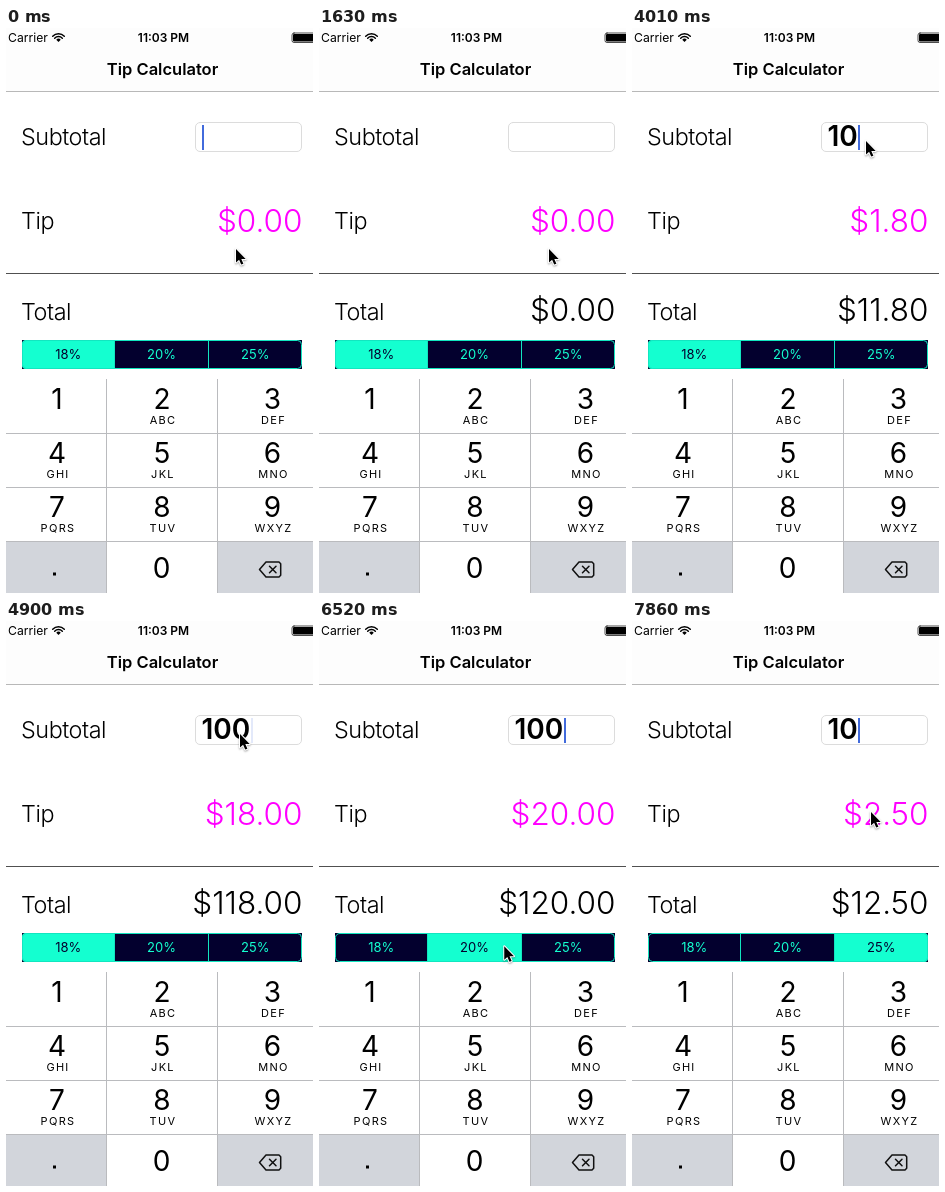
Recreate the animation shown at these times as an HTML page with a canvas. Size 307 by 565 pixels, loop 8 s.

```html
<!DOCTYPE html>
<html lang="en">
<head>
<meta charset="utf-8">
<title>Tip Calculator</title>
<style>
  html, body { margin: 0; width: 100%; height: 100%; overflow: hidden; background: #fff; }
  canvas { display: block; width: 307px; height: 565px; }
</style>
</head>
<body>
<canvas id="stage"></canvas>
<script>
const W = 307, H = 565, LOOP = 8000, TICK = 148;
const MINT = [20, 255, 208], NAVY = [3, 0, 46];
const canvas = document.getElementById('stage');
const ctx = canvas.getContext('2d');
const dpr = window.devicePixelRatio || 1;
canvas.width = W * dpr;
canvas.height = H * dpr;

const clamp = v => Math.max(0, Math.min(1, v));
const ease = v => v * v * (3 - 2 * v);
const mix = (a, b, k) => `rgb(${a.map((v, i) => Math.round(v + (b[i] - v) * k))})`;

function rect(x, y, w, h, color) {
  ctx.fillStyle = color;
  ctx.fillRect(x, y, w, h);
}

function box(x, y, w, h, r) {
  ctx.beginPath();
  ctx.roundRect(x, y, w, h, r);
}

function path(points, close) {
  ctx.beginPath();
  points.forEach(([x, y]) => ctx.lineTo(x, y));
  if (close) ctx.closePath();
}

function text(str, x, y, size, { weight = 400, color = '#000', align = 'left', gap = 0 } = {}) {
  ctx.font = `${weight} ${size}px Inter, Roboto, sans-serif`;
  ctx.letterSpacing = gap + 'px';
  ctx.textAlign = align;
  ctx.fillStyle = color;
  ctx.fillText(str, x, y);
  return ctx.measureText(str).width;
}

// Cursor stops: tick, x, y
const stops = [[0, 229, 220], [14, 229, 220], [20, 233, 112], [38, 233, 112],
  [41, 170, 324], [43, 170, 324], [46, 225, 325], [47, 225, 325], [50, 238, 190], [60, 238, 190]];

function cursorAt(n) {
  const i = stops.findIndex((s, j) => j > 0 && n <= s[0]);
  const [t0, x0, y0] = stops[i - 1], [t1, x1, y1] = stops[i];
  const k = ease((n - t0) / (t1 - t0));
  return [x0 + (x1 - x0) * k, y0 + (y1 - y0) * k];
}

// Each blink dims for one tick, then stays dark until the given tick
const blinks = [[3, 6, .5], [9, 12, .5], [15, 18, .5], [33, 36, .15], [39, 43, .5], [46, 49, .4]];

function caretAlpha(n) {
  const b = blinks.find(([from, to]) => n >= from && n < to);
  return !b ? 1 : n === b[0] ? b[2] : 0;
}

function subtotalAt(n) {
  return n < 24 ? '' : n < 27 ? '1' : n < 29 ? '10' : n < 53 ? '100' : '10';
}

// How far each segment is lit
function segments(n) {
  return [
    n < 43 ? 1 : n === 43 ? .15 : 0,
    n < 42 ? 0 : n === 42 ? .14 : n < 47 ? 1 : n === 47 ? .12 : 0,
    n < 46 ? 0 : n === 46 ? .14 : n === 47 ? .9 : 1
  ];
}

function statusBar() {
  rect(0, 0, W, 63, '#fdfdfd');
  rect(0, 63, W, 1, '#b8b8b8');
  text('Carrier', 2, 14, 12.2);
  text('11:03 PM', 157.5, 14, 12, { weight: 600, align: 'center' });
  ctx.strokeStyle = '#000';
  ctx.lineWidth = 1.5;
  for (const r of [8.2, 5.4]) {
    ctx.beginPath();
    ctx.arc(52.5, 14, r, -Math.PI * .75, -Math.PI * .25);
    ctx.stroke();
  }
  ctx.fillStyle = '#000';
  ctx.beginPath();
  ctx.moveTo(52.5, 14);
  ctx.arc(52.5, 14, 3.2, -Math.PI * .75, -Math.PI * .25);
  ctx.fill();
  ctx.lineWidth = .7;
  box(286, 5, 25, 9.5, 2);
  ctx.stroke();
  box(287, 6, 22, 7.5, 1);
  ctx.fill();
  text('Tip Calculator', 156.5, 47, 16.5, { weight: 600, align: 'center' });
}

function keypad() {
  const cols = [51, 156, 266.5];
  const hints = ['', 'ABC', 'DEF', 'GHI', 'JKL', 'MNO', 'PQRS', 'TUV', 'WXYZ'];
  rect(0, 514, 100, 51, '#d2d5db');
  rect(212, 514, 95, 51, '#d2d5db');
  for (const x of [100, 211]) rect(x, 351, 1, 214, '#babbbe');
  for (const y of [405, 459, 513]) rect(0, y, W, 1, '#babbbe');
  hints.forEach((hint, i) => {
    const x = cols[i % 3], y = 381 + 54 * Math.floor(i / 3);
    text(String(i + 1), x, y, 28, { align: 'center' });
    text(hint, x + 1, y + 15, 11, { align: 'center', gap: 1.3 });
  });
  text('0', 155.5, 550, 28, { align: 'center' });
  rect(47, 544.5, 3, 3, '#000');

  ctx.strokeStyle = '#111';
  ctx.lineWidth = 1.5;
  ctx.lineJoin = ctx.lineCap = 'round';
  path([[253.5, 541.5], [260, 534], [273, 534], [274.7, 535.7], [274.7, 547.3], [273, 549], [260, 549]], true);
  ctx.stroke();
  path([[263.5, 538.2], [270, 544.8]]);
  ctx.stroke();
  path([[270, 538.2], [263.5, 544.8]]);
  ctx.stroke();
}

function rates(n) {
  const edges = [16, 108.5, 202.5, 296];
  rect(16, 312, 280, 29, '#03002e');
  ctx.save();
  box(16, 312, 280, 29, 4);
  ctx.clip();
  segments(n).forEach((lit, i) => {
    const x = edges[i], w = edges[i + 1] - x;
    rect(x, 312, w, 29, mix(NAVY, MINT, lit));
    text(['18%', '20%', '25%'][i], x + w / 2, 331, 13,
      { color: mix(MINT, NAVY, lit > .5 ? 1 : 0), align: 'center' });
  });
  ctx.restore();
  for (const x of [108, 202]) rect(x, 312, 1, 29, mix(MINT, NAVY, .1));
  ctx.strokeStyle = mix(MINT, NAVY, .1);
  ctx.lineWidth = 1;
  box(16.5, 312.5, 279, 28, 4);
  ctx.stroke();
}

function form(n) {
  const label = { weight: 300, gap: -.45 };
  text('Subtotal', 15, 117, 23.4, label);
  text('Tip', 15, 201, 23.4, label);
  text('Total', 15, 291.5, 23.4, label);
  rect(0, 245, W, 1, '#505050');

  ctx.strokeStyle = '#dcdcdc';
  ctx.lineWidth = 1;
  box(189.5, 94.5, 106, 29, 4.5);
  ctx.stroke();
  const typed = subtotalAt(n);
  const width = text(typed, 195.5, 118, 28, { weight: 600 });
  ctx.globalAlpha = caretAlpha(n);
  rect(Math.round(196 + width), 97, 2, 25, '#426bdc');
  ctx.globalAlpha = 1;

  const sum = Number(typed);
  const tip = sum * (n < 43 ? 18 : n < 47 ? 20 : 25) / 100;
  const amount = { weight: 300, align: 'right' };
  text('$' + tip.toFixed(2), 296.5, 204, 31.5, { ...amount, color: '#ff00ff' });
  ctx.globalAlpha = clamp((n - 5) / 6);
  text('$' + (sum + tip).toFixed(2), 296.5, 292.5, 31.5, amount);
  ctx.globalAlpha = 1;
}

function cursor(n) {
  const [x, y] = cursorAt(n);
  ctx.save();
  ctx.translate(x + 1, y + 1);
  ctx.shadowColor = 'rgba(0,0,0,.35)';
  ctx.shadowBlur = 2 * dpr;
  ctx.shadowOffsetY = dpr;
  path([[0, 0], [0, 13.6], [3.1, 10.7], [5.2, 15.6], [7.4, 14.7], [5.3, 9.9], [9.7, 9.9]], true);
  ctx.lineJoin = 'round';
  ctx.lineWidth = 2;
  ctx.strokeStyle = '#fff';
  ctx.stroke();
  ctx.shadowColor = 'transparent';
  ctx.fillStyle = '#000';
  ctx.fill();
  ctx.restore();
}

function draw(ms) {
  const n = Math.min(53, Math.floor(ms / TICK));
  ctx.setTransform(dpr, 0, 0, dpr, 0, 0);
  rect(0, 0, W, H, '#fff');
  statusBar();
  form(n);
  rates(n);
  keypad();
  cursor(n);
}

const start = performance.now();
function frame() {
  draw((performance.now() - start) % LOOP);
  requestAnimationFrame(frame);
}
frame();
</script>
</body>
</html>
```
